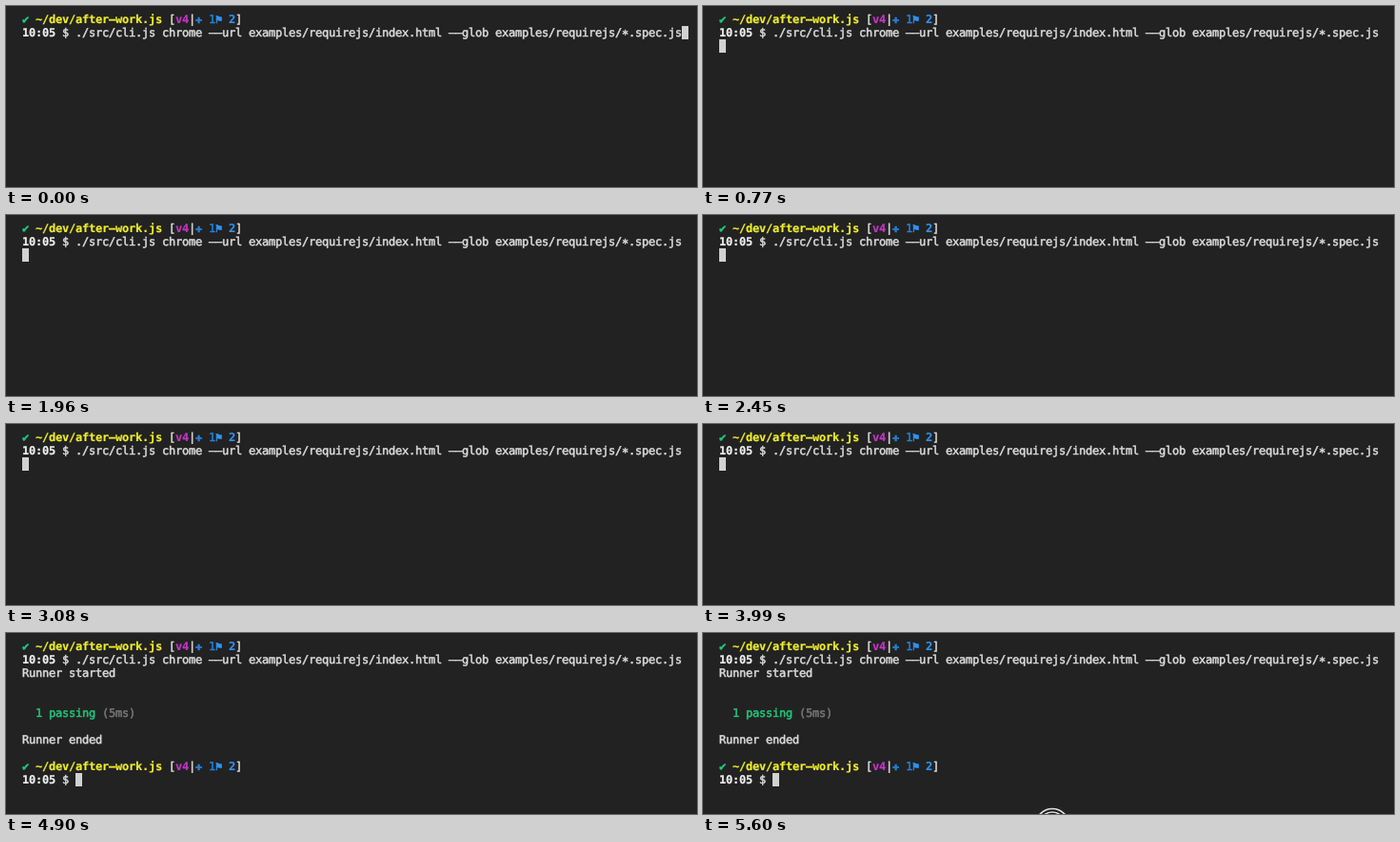
An HTML page for the animation above (5670 ms loop, 726 by 190 pixels).

```html
<!DOCTYPE html>
<html lang="en">
<head>
<meta charset="utf-8">
<title>Terminal</title>
<style>
html, body { margin: 0; width: 726px; height: 190px; overflow: hidden; background: #222; }
#term {
  position: relative; width: 726px; height: 190px; overflow: hidden; background: #222;
  font: 12px/14px "DejaVu Sans Mono", "Liberation Mono", monospace;
  letter-spacing: calc(7px - 1ch); color: #dcdcdc;
  -webkit-text-stroke: .5px; font-variant-ligatures: none;
  text-rendering: geometricPrecision;
}
.row { position: absolute; left: 17px; height: 14px; white-space: pre; }
b { font-weight: bold; -webkit-text-stroke: .2px; }
i { display: inline-block; width: 7px; height: 14px; vertical-align: top; font-style: normal; letter-spacing: 0; }
.low { position: relative; top: 2px; }
.white { color: #f0f0f0; }
.green { color: #20c77c; }
.yellow { color: #efed2c; }
.pink { color: #c335c4; }
.blue { color: #2480d8; }
.sky { color: #2f93f5; }
.grey { color: #777; }
#cursor { position: absolute; width: 7px; height: 14px; background: #d2d2d2; }
#button { position: absolute; left: 348px; top: 183px; }
</style>
</head>
<body>
<div id="term">
  <div id="cursor"></div>
  <svg id="button" width="38" height="38" fill="#1b1b1b" stroke="#e4e4e4">
    <circle cx="19" cy="19" r="17.5" stroke-width="1.6"/>
    <circle cx="19" cy="19" r="14" stroke-width="1.6"/>
  </svg>
</div>
<script>
const LOOP = 5670, CELL = 7, LINE = 14, LEFT = 17, TOP = 7;
const term = document.getElementById('term');
const cursor = document.getElementById('cursor');
const button = document.getElementById('button');

const paint = (cls, text, tag = 'span') => `<${tag} class="${cls}">${text}</${tag}>`;
const clock = paint('white', '10:05', 'b') + ' $ ';
const status = paint('green', '✔', 'i') + ' ' +
  paint('yellow', '~/dev/after–work.js', 'b') + ' [' + paint('pink', 'v4', 'b') + '|' +
  paint('blue', '✚', 'i') + ' ' + paint('blue', '1') + paint('sky', '⚑', 'i') + ' ' +
  paint('sky', '2', 'b') + ']';
const command = './src/cli.js chrome ––url examples/requirejs/index.html ' +
  '––glob examples/requirejs/' + paint('low', '*', 'i') + '.spec.js';

const ENTER = 350, STARTED = 4270, DONE = 4340, BUTTON = 5530;

// line number, time it is printed, content
const rows = [
  [0, 0, status],
  [1, 0, clock + command],
  [2, STARTED, 'Runner started'],
  [5, DONE, '  ' + paint('green', '1 passing') + ' ' + paint('grey', '(5ms)')],
  [7, DONE, 'Runner ended'],
  [9, DONE, status],
  [10, DONE, clock]
].map(([line, at, html]) => {
  const el = document.createElement('div');
  el.className = 'row';
  el.style.top = TOP + line * LINE + 'px';
  el.innerHTML = html;
  term.insertBefore(el, button);
  return { el, at };
});

// time, column, line
const cursorSteps = [[0, 99, 1], [ENTER, 0, 2], [STARTED, 0, 3], [DONE, 8, 10]];

const show = (el, on) => { el.style.visibility = on ? 'visible' : 'hidden'; };

function draw(now) {
  const t = now % LOOP;
  for (const { el, at } of rows) show(el, t >= at);
  const [, col, line] = cursorSteps.filter(step => t >= step[0]).pop();
  cursor.style.left = LEFT + col * CELL + 'px';
  cursor.style.top = TOP + line * LINE + 'px';
  show(button, t >= BUTTON);
}

const start = performance.now();
function tick() {
  draw(performance.now() - start);
  requestAnimationFrame(tick);
}
tick();
</script>
</body>
</html>
```
